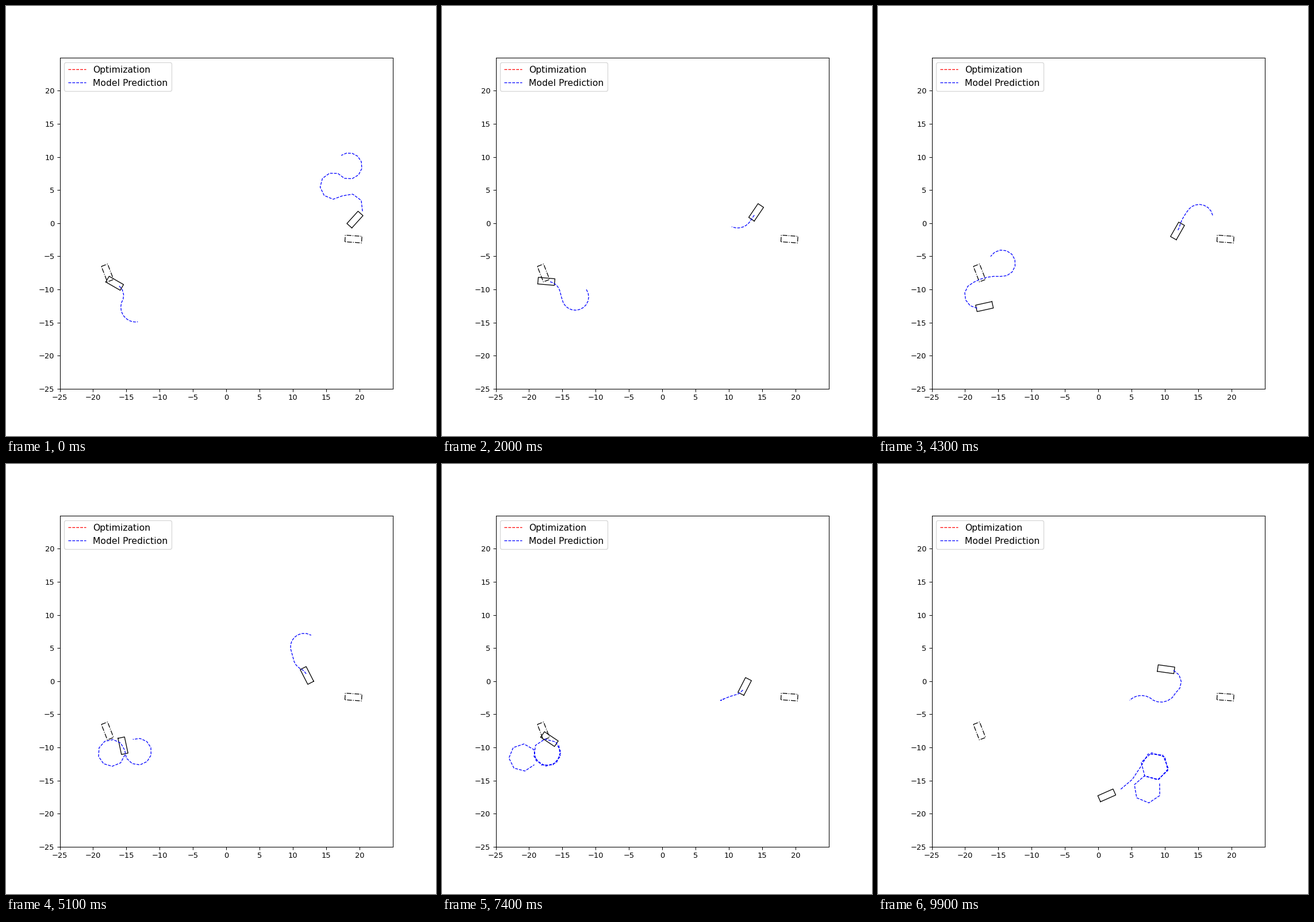
Animation of 748x748 px, one loop 10 s. Source, as a matplotlib script:

```python
import numpy as np
import matplotlib.pyplot as plt
from matplotlib.animation import FuncAnimation

FRAMES, HORIZON = 100, 19
RADIUS = 2.0                       # tightest turn
BEND = np.degrees(1 / RADIUS)      # degrees per unit driven at full lock


class Stop:
    """A pose with the plan made there: speed ramp and runs of steering."""

    def __init__(self, t, x, y, head, speed, *runs):
        self.t, self.pos, self.head = t, np.array([x, y]), head
        self.speed = np.linspace(*speed, HORIZON)
        counts, locks = zip(*runs)
        self.steer = np.repeat(locks, counts)
        self.rate = BEND * self.speed[0] * self.steer[0]


# Headings are in degrees and keep counting through full laps.
WEST = [
    Stop(0, -16.76, -9.08, -30, (.8, .05), (4, -1), (15, .85)),
    Stop(20, -17.41, -8.79, -365, (.57, .6),
         (4, -1), (1, -.4), (2, .2), (12, 1)),
    Stop(35, -18.88, -9.62, -679, (.86, .72), (5, -1), (4, .42), (10, 1)),
    Stop(51, -15.51, -9.75, -1158, (1.4, 1.08), (9, -1), (1, -.5), (9, 1)),
    Stop(74, -16.94, -8.75, -2194, (1.7, 1.7), (12, -1), (7, 1)),
    Stop(82, -15.90, -9.62, -2584, (2, 2.1), (4, -.35), (3, .8), (12, -1)),
    Stop(86, -13.87, -18.12, -2626, (2.03, 2.15), (2, .9), (1, .3), (16, -1)),
    Stop(99, 1.26, -17.25, -2496, (2.3, 1.95),
         (2, .25), (1, .05), (10, -1), (6, 1)),
]
EAST = [
    Stop(0, 19.29, .54, 48, (1.69, .84), (3, 1), (1, .25), (6, -1), (9, 1)),
    Stop(20, 14.07, 1.63, 416, (-.5, 0), (3, 0), (16, .85)),
    Stop(35, 11.10, -1.98, 395, (0, .76), (8, .25), (3, -.4), (8, -1)),
    Stop(51, 12.09, .86, 477, (.27, .73), (4, 1), (4, -1), (3, 0), (8, -1)),
    Stop(74, 12.35, -.80, 423, (-.6, .2), (3, 1), (16, -.15)),
    Stop(86, 9.50, 1.60, 375, (.87, .2), (4, -1), (6, .55), (2, -.8), (7, 1)),
    Stop(99, 10.15, 1.80, -8, (1.15, .23),
         (4, -1), (1, .2), (5, -.8), (9, .75)),
]
TARGETS = [(-17.84, -7.52, -69), (19.06, -2.40, -4)]


def ray(deg):
    a = np.radians(deg)
    return np.stack([np.cos(a), np.sin(a)], -1)


def mix(a, b, w):
    return a + (b - a) * w


def hermite(a, b, da, db, u):
    return (mix(a, b, u * u * (3 - 2 * u))
            + da * u * (1 - u) ** 2 - db * u * u * (1 - u))


def leg(stops, k):
    """Neighbouring stops around time k and the progress between them."""
    a, b = next(p for p in zip(stops, stops[1:]) if k <= p[1].t)
    return a, b, (k - a.t) / (b.t - a.t)


def pose(a, b, u):
    """Circle about a centre that slides from one stop's to the next's."""
    span = b.t - a.t
    head = hermite(a.head, b.head, a.rate * span, b.rate * span, u)
    arm = RADIUS * np.sign(b.head - a.head)
    centre = mix(a.pos + arm * ray(a.head + 90),
                 b.pos + arm * ray(b.head + 90), u)
    return centre - arm * ray(head + 90), head


def forecast(pos, head, speed, steer):
    turn = np.cumsum(BEND * speed * steer)
    heads = head + np.r_[0, turn[:-1]]
    return pos + np.cumsum(speed[:, None] * ray(heads), axis=0)


def outline(pos, head):
    along, across = 1.25 * ray(head), .5 * ray(head + 90)
    corners = ((-1, -1), (-1, 1), (1, 1), (1, -1), (-1, -1))
    return np.array([pos + i * along + j * across for i, j in corners]).T


fig, ax = plt.subplots(figsize=(8, 8), dpi=93.5)
ticks = np.arange(-25, 25, 5)
ax.set(xlim=(-25, 25), ylim=(-25, 25), xticks=ticks, yticks=ticks)

for x, y, head in TARGETS:
    ax.plot(*outline(np.array([x, y]), head), "k-.", lw=1)
bodies = [ax.plot([], [], "k-", lw=1)[0] for _ in range(2)]
ax.plot([], [], "r--", lw=1, label="Optimization")
trails = [ax.plot([], [], "b--", lw=1, label=name)[0]
          for name in ("Model Prediction", "_nolegend_")]
ax.legend(loc="upper left", fontsize=12)


def draw(k):
    for stops, body, trail in zip((WEST, EAST), bodies, trails):
        a, b, u = leg(stops, k)
        pos, head = pose(a, b, u)
        speed, steer = mix(a.speed, b.speed, u), mix(a.steer, b.steer, u)
        body.set_data(*outline(pos, head))
        trail.set_data(*forecast(pos, head, speed, steer).T)
    return bodies + trails


anim = FuncAnimation(fig, draw, frames=FRAMES, interval=100, repeat=True)
plt.show()
```
